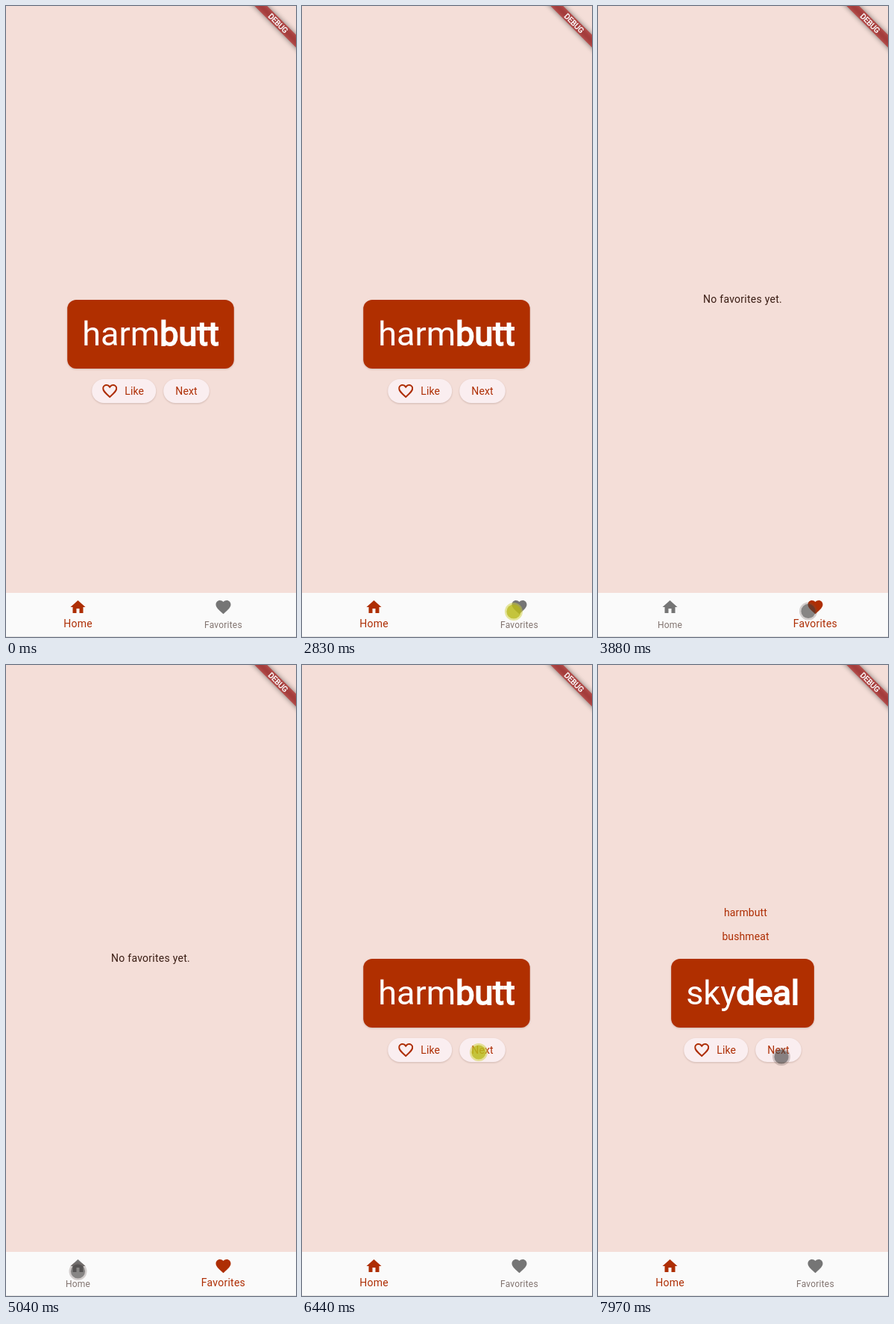
Recreate the animation shown at these times as an HTML page. Size 389x844 px, loop 8000 ms.

```html
<!DOCTYPE html>
<html lang="en">
<head>
<meta charset="utf-8">
<title>Word pairs</title>
<style>
  html, body { margin: 0; width: 100%; height: 100%; overflow: hidden; background: #f4ded8; }
  #stage { display: block; width: 100%; height: 100%; }
  text { font-family: Roboto, Arial, sans-serif; font-size: 14px; letter-spacing: .1px; text-anchor: middle; fill: #ae2e04; }
  .word { font-size: 45px; letter-spacing: 0; fill: #fff; }
  .word tspan { stroke: #fff; stroke-width: 1.9px; }
  .pill { fill: #faeef0; }
  .raised { filter: drop-shadow(0 1px 1px rgba(70, 30, 20, .2)); }
  .tab text { letter-spacing: .25px; }
  #empty { fill: #3a1d14; letter-spacing: .25px; }
  #banner text { font-size: 10.2px; letter-spacing: 0; fill: #fff; stroke: #fff; stroke-width: .45px; }
  #cursor .ring { filter: blur(.6px); }
  #cursor.idle .ring { fill: rgba(100, 82, 76, .26); }
  #cursor.idle .core { fill: rgba(60, 60, 60, .5); }
  #cursor.pressed .ring { fill: rgba(208, 208, 60, .5); }
  #cursor.pressed .core { fill: rgba(182, 182, 20, .7); }
</style>
</head>
<body>
<svg id="stage" viewBox="0 0 389 844" preserveAspectRatio="none">
  <defs>
    <clipPath id="barClip"><rect y="785" width="389" height="58"/></clipPath>
    <clipPath id="wordClip"><rect id="wordBox" y="393" height="92"/></clipPath>
    <filter id="soft" x="-30%" y="-200%" width="160%" height="500%"><feGaussianBlur stdDeviation="3.9"/></filter>
    <path id="heart" d="M12 21.35l-1.45-1.32C5.4 15.36 2 12.28 2 8.5 2 5.42 4.42 3 7.5 3c1.74 0 3.41.81 4.5 2.09C13.09 3.81 14.76 3 16.5 3 19.58 3 22 5.42 22 8.5c0 3.78-3.4 6.86-8.55 11.54z"/>
    <clipPath id="heartClip"><use href="#heart"/></clipPath>
  </defs>
  <rect width="389" height="844" fill="#f4ded8"/>

  <g id="home">
    <svg class="past" width="389"><text x="198">harmbutt</text></svg>
    <svg class="past" width="389"><text x="198">bushmeat</text></svg>
    <rect id="card" class="raised" y="393" height="92" rx="12" fill="#b02f00"/>
    <g clip-path="url(#wordClip)">
      <text class="word" x="194" y="454.4">harm<tspan>butt</tspan></text>
      <text class="word" x="194" y="454.4">bush<tspan>meat</tspan></text>
      <text class="word" x="194" y="454.4">sky<tspan>deal</tspan></text>
    </g>
    <g class="raised">
      <rect class="pill" x="115.2" y="499" width="86" height="32" rx="16"/>
      <rect class="pill" x="211.2" y="499" width="61.6" height="32" rx="16"/>
    </g>
    <use href="#heart" transform="translate(127.2 503)" clip-path="url(#heartClip)" fill="none" stroke="#ae2e04" stroke-width="4"/>
    <text x="172.2" y="520">Like</text>
    <text x="242" y="520">Next</text>
  </g>
  <text id="empty" x="194" y="397">No favorites yet.</text>

  <rect y="785" width="389" height="59" fill="#fafafa"/>
  <g clip-path="url(#barClip)">
    <circle class="ripple" cx="291.5" cy="814"/>
    <circle class="ripple" cx="96.5" cy="814"/>
  </g>
  <rect y="843" width="389" height="1" fill="#e2e2e2"/>
  <g class="tab">
    <path transform="translate(84.5 792)" d="M10 20v-6h4v6h5v-8h3L12 3 2 12h3v8z"/>
    <text>Home</text>
  </g>
  <g class="tab">
    <use href="#heart" transform="translate(279.5 792)"/>
    <text>Favorites</text>
  </g>

  <g id="banner" transform="translate(389 -1) rotate(45)">
    <rect x="-60" y="28" width="120" height="12" fill="#000" opacity=".5" filter="url(#soft)"/>
    <rect x="-60" y="28" width="120" height="12" fill="#b71c1c" fill-opacity=".63"/>
    <text y="37.6">DEBUG</text>
  </g>

  <g id="cursor"><circle class="ring" r="12"/><circle class="core" r="9.6"/></g>
</svg>

<script>
const LOOP = 8000, STEP = 70;
const $ = id => document.getElementById(id);
const all = selector => [...document.querySelectorAll(selector)];
const set = (el, attrs) => Object.entries(attrs).forEach(([k, v]) => el.setAttribute(k, v));
const mix = (a, b, p) => a + (b - a) * p;
const progress = (t, start, length) => Math.min(1, Math.max(0, (t - start) / length));
const ease = p => p * p * (3 - 2 * p);

const OPEN_FAVORITES = 2960, OPEN_HOME = 5100;
const NEXT = [6545, 7515];
const PRESSES = [2830, 4970, 6440, 7410];

// Pointer trips: each leaves the last stop and bends towards a control point
const ENTRY = [358, 848];
const TRIPS = [
  { start: 980, length: 840, bend: [342, 800], to: [322, 787] },
  { start: 1820, length: 540, bend: [303, 796], to: [284, 810] },
  { start: 3800, length: 840, bend: [190, 782], to: [96.5, 811] },
  { start: 5140, length: 730, bend: [200, 770], to: [237, 518] },
  { start: 6660, length: 550, bend: [242, 520], to: [246, 524] }
];

const words = all('.word');
const widths = words.map(word => word.getComputedTextLength() + 40);
const past = all('.past'), ripples = all('.ripple'), tabs = all('.tab');

function pointerAt(t) {
  return TRIPS.reduce((from, { start, length, bend, to }) => {
    const p = ease(progress(t, start, length));
    return from.map((v, i) => mix(mix(v, bend[i], p), mix(bend[i], to[i], p), p));
  }, ENTRY);
}

function drawTab(tab, x, active) {
  const [icon, label] = tab.children;
  const blend = from => `rgb(${from.map((c, i) => Math.round(mix(c, [174, 46, 4][i], active)))})`;
  icon.style.fill = blend([117, 117, 117]);
  label.style.fill = blend([130, 116, 112]);
  set(label, { transform: `translate(${x} 834.5) scale(${mix(12 / 14, 1, active)})`, y: -3.5 });
}

function drawRipple(circle, t, start) {
  const fade = progress(t, start + 225, 100);
  set(circle, {
    r: mix(20, 106.5, ease(progress(t, start, 220))),
    'fill-opacity': t < start ? 0 : .07 * (1 - fade)
  });
}

function drawCard(t) {
  const current = NEXT.filter(n => t >= n).length;
  const grow = current ? progress(t, NEXT[current - 1], 200) : 1;
  const width = mix(widths[Math.max(0, current - 1)], widths[current], grow);
  words.forEach((word, i) => { word.style.display = i === current ? '' : 'none'; });
  set($('card'), { x: 194 - width / 2, width });
  set($('wordBox'), { x: 213 - width / 2, width: width - 38 });
}

function drawPast(t) {
  let bottom = 379;
  for (let i = past.length - 1; i >= 0; i--) {
    const height = 32 * progress(t, NEXT[i], 300);
    bottom -= height;
    set(past[i], { y: bottom, height });
    set(past[i].firstElementChild, { y: height / 2 + 5 });
  }
}

function draw(t, pressed) {
  const favorites = progress(t, OPEN_FAVORITES, 200) - progress(t, OPEN_HOME, 200);
  $('home').style.opacity = 1 - favorites;
  $('empty').style.opacity = favorites;
  drawTab(tabs[0], 96.5, ease(1 - favorites));
  drawTab(tabs[1], 291.4, ease(favorites));
  drawRipple(ripples[0], t, OPEN_FAVORITES);
  drawRipple(ripples[1], t, OPEN_HOME);
  drawCard(t);
  drawPast(t);
  set($('cursor'), {
    class: pressed ? 'pressed' : 'idle',
    transform: `translate(${pointerAt(t)})`,
    visibility: t < 1050 ? 'hidden' : 'visible'
  });
}

const begin = performance.now();
function tick() {
  const t = (performance.now() - begin) % LOOP;
  draw(Math.floor(t / STEP) * STEP, PRESSES.some(p => t >= p && t < p + STEP));
  requestAnimationFrame(tick);
}
tick();
</script>
</body>
</html>
```
